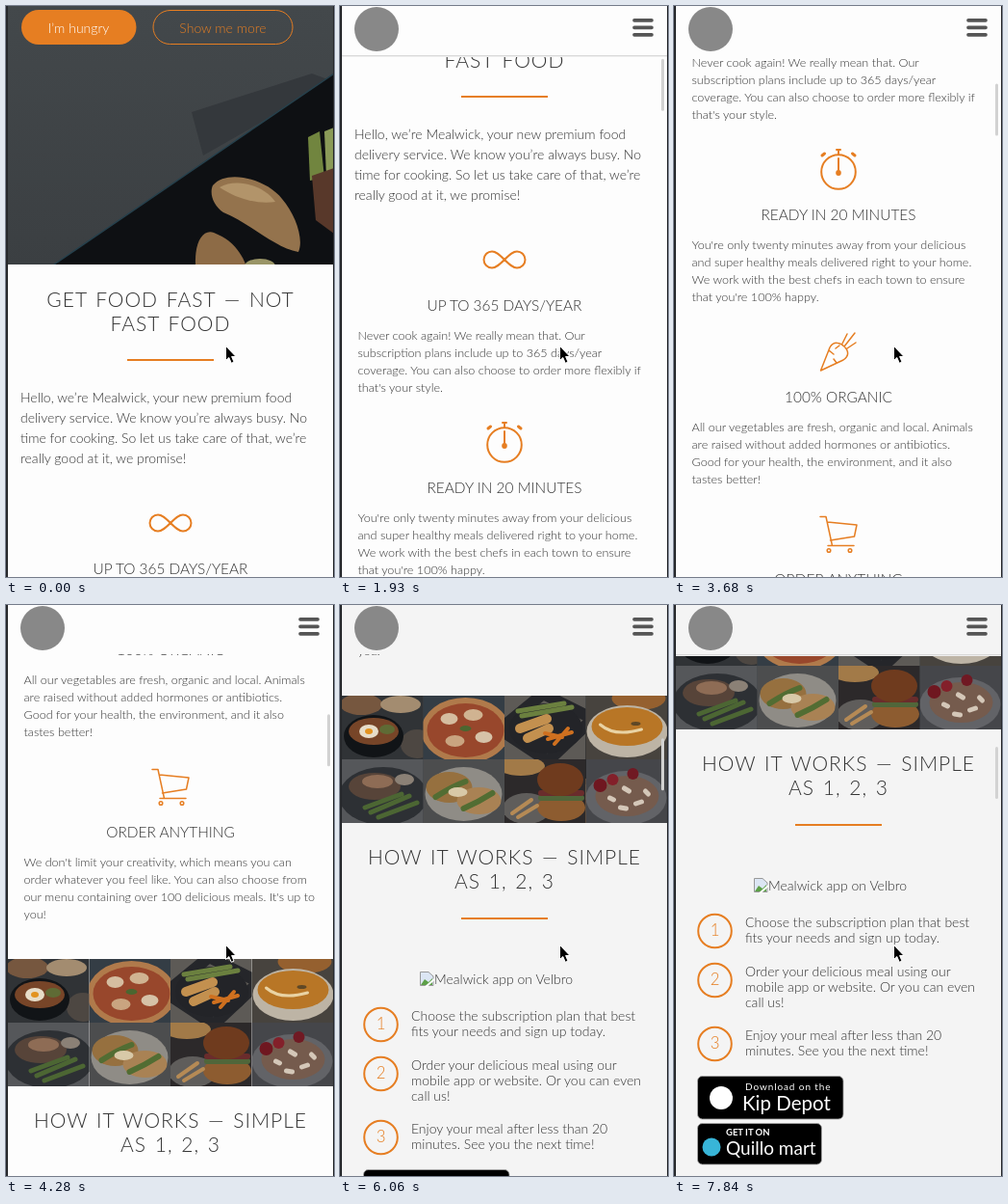
An HTML page that plays this animation: 341x592 px, repeating every 7.99 s.

```html
<!DOCTYPE html>
<html lang="en">
<head>
<meta charset="utf-8">
<title>Food delivery page</title>
<style>
  html, body { margin: 0; width: 100%; height: 100%; overflow: hidden; background: #fdfdfd; }
  svg { display: block; width: 341px; height: 592px; }
  text { font: 300 14px Lato, sans-serif; fill: #333; }
  .title { font-size: 21px; letter-spacing: 1px; word-spacing: 2px; }
  .head { font-size: 15.4px; }
  .small { font-size: 12.6px; }
  .num { font-size: 16.8px; fill: #e67e22; }
  .mid { text-anchor: middle; }
  .line { fill: none; stroke: #e67e22; stroke-width: 2; stroke-linejoin: round; stroke-linecap: round; }
  .thin { stroke-width: 1.5; }
  .thick { stroke-width: 3; }
  .badge { fill: #000; stroke: #a6a6a6; stroke-width: .8; }
  .badge ~ text { fill: #fff; }
  .paper { fill: var(--paper); }
</style>
</head>
<body>
<svg id="stage" viewBox="0 0 341 592">
  <defs>
    <linearGradient id="wall" x2="0" y2="1">
      <stop stop-color="#43484b"/><stop offset="1" stop-color="#3b3f42"/>
    </linearGradient>
    <clipPath id="tile"><rect width="84.5" height="66"/></clipPath>
  </defs>

  <!-- hero photo stays put while the page slides over it -->
  <rect width="341" height="270" fill="url(#wall)"/>
  <path d="M193 110L318 70L340 78L205 155Z" fill="#34383c"/>
  <path d="M50 268L341 70V268Z" fill="#0e1013"/>
  <path d="M50 268L341 70" stroke="#26404c" stroke-width="1.5"/>
  <path d="M215 186C230 168 272 180 287 200C301 216 310 242 304 255C280 251 255 226 226 214C216 207 211 195 215 186Z" fill="#94734d"/>
  <path d="M222 188C240 178 268 186 280 203C262 206 240 200 222 188Z" fill="#b2946a"/>
  <path d="M197 268C196 246 204 231 216 235C234 242 244 254 250 270Z" fill="#8d6b46"/>
  <ellipse cx="264" cy="270" rx="16" ry="8" fill="#9a9567"/>
  <path d="M314 136L326 130L331 178L316 181Z" fill="#71853f"/>
  <path d="M331 130L341 126V176L333 176Z" fill="#8a9a58"/>
  <path d="M318 176L341 168V236L322 222Z" fill="#58382a"/>

  <g id="page"></g>

  <g id="bar">
    <rect class="paper" width="341" height="51"/>
    <g id="shadow">
      <path d="M0 51.5H341" stroke="#d9d9d9"/>
      <path d="M0 52.5H341" stroke="#efefef"/>
    </g>
    <circle cx="38" cy="24" r="23" fill="#888"/>
    <path d="M306 14.8H324M306 22.3H324M306 29.8H324" stroke="#555" stroke-width="3.7" stroke-linecap="round"/>
  </g>
  <rect id="thumb" x="334" width="3" height="54" rx="1.5" fill="#d2d2d2"/>
  <path d="M0 0H2V592H0ZM340 0H341V592H340Z" fill="#26282b"/>
  <path d="M228.5 352.5V367.5L231.8 364.5L234.3 370.3L237 369.1L234.6 363.5H239Z" fill="#000" stroke="#fff"/>
</svg>

<script>
const el = id => document.getElementById(id);

const text = (x, y, str, cls = '', attrs = '') =>
  `<text x="${x}" y="${y}" class="${cls}" ${attrs}>${str}</text>`;
const lines = (x, y, gap, cls, rows) =>
  rows.map((row, i) => text(x, y + i * gap, row, cls)).join('');
const rect = (x, y, w, h, attrs) =>
  `<rect x="${x}" y="${y}" width="${w}" height="${h}" ${attrs}/>`;
const oval = (x, y, rx, ry, fill) =>
  `<ellipse cx="${x}" cy="${y}" rx="${rx}" ry="${ry}" fill="${fill}"/>`;
const stroke = (d, color, width) =>
  `<path d="${d}" fill="none" stroke="${color}" stroke-width="${width}" stroke-linecap="round"/>`;
const icon = (d, cls = '') => `<path d="${d}" class="line ${cls}"/>`;
const rule = y => rect(126, y, 90, 2, 'fill="#e67e22"');
const title = (y, rows) => lines(171, y, 25, 'title mid', rows);

const intro =
  rect(16, 4, 119.5, 36, 'rx="18" fill="#e67e22"') +
  text(75.5, 28, 'I’m hungry', 'mid', 'style="fill:#fff"') +
  rect(153, 4.5, 145, 35, 'rx="17.5" class="line" style="stroke-width:1"') +
  text(225.5, 28, 'Show me more', 'mid', 'style="fill:#e67e22"') +
  rect(0, 268, 341, 1014, 'class="paper"') +
  title(312, ['GET FOOD FAST — NOT', 'FAST FOOD']) + rule(366) +
  lines(15, 411, 21, '', [
    'Hello, we’re Mealwick, your new premium food',
    'delivery service. We know you’re always busy. No',
    'time for cooking. So let us take care of that, we’re',
    'really good at it, we promise!']);

const icons =
  icon('M171 536C165 530 162 527.5 158 527.5A8.5 8.5 0 0 0 158 544.5C162 544.5 165 542 171 536S180 527.5 184 527.5A8.5 8.5 0 0 1 184 544.5C180 544.5 177 542 171 536') +
  '<circle cx="171" cy="728" r="17.8" class="line"/>' +
  icon('M171 705V710M169 705H173M171 714V726') +
  icon('M154 711L156.5 709M188 711L185.5 709', 'thick') +
  oval(171, 729, 2.8, 3, '#e67e22') +
  icon('M152.5 934L162 910C166 903 173 905 177 909C182 914 182 919 176 923ZM177 909L188 895M175 906L180 896M180 911L189 905M161 913L166 917M169 926L166 922M172 908L168 911', 'thin') +
  icon('M152 1085.5H158L164.5 1115.5M160 1115.5H187M159.5 1091L190 1094L187.5 1106L162.5 1110', 'thin') +
  '<circle cx="161" cy="1120.5" r="1.8" class="line thin"/><circle cx="183" cy="1120.5" r="1.8" class="line thin"/>';

const features = [
  ['UP TO 365 DAYS/YEAR',
    'Never cook again! We really mean that. Our',
    'subscription plans include up to 365 days/year',
    'coverage. You can also choose to order more flexibly if',
    'that\'s your style.'],
  ['READY IN 20 MINUTES',
    'You\'re only twenty minutes away from your delicious',
    'and super healthy meals delivered right to your home.',
    'We work with the best chefs in each town to ensure',
    'that you\'re 100% happy.'],
  ['100% ORGANIC',
    'All our vegetables are fresh, organic and local. Animals',
    'are raised without added hormones or antibiotics.',
    'Good for your health, the environment, and it also',
    'tastes better!'],
  ['ORDER ANYTHING',
    'We don\'t limit your creativity, which means you can',
    'order whatever you feel like. You can also choose from',
    'our menu containing over 100 delicious meals. It\'s up to',
    'you!']
].map(([head, ...rows], i) =>
  text(171, 588.5 + i * 189, head, 'head mid') +
  lines(18.5, 618.5 + i * 189, 18, 'small', rows)).join('');

const photo = (col, row, back, ...shapes) =>
  `<g transform="translate(${2 + col * 84.5} ${1282 + row * 66})" clip-path="url(#tile)">` +
  rect(0, 0, 85, 66, `fill="${back}"`) + shapes.join('') + '</g>';

const photos =
  photo(0, 0, '#303336', oval(20, 9, 22, 11, '#76573f'), oval(61, 9, 21, 9, '#a38c70'),
    oval(78, 50, 17, 15, '#4d4742'), oval(33, 42, 31, 22, '#111417'), oval(33, 37, 26, 14, '#774528'),
    oval(28, 37, 10, 7, '#e7ddc8'), oval(28, 37, 4, 3, '#e29320'), oval(47, 35, 8, 5, '#5f6b35')) +
  photo(1, 0, '#343d45', oval(44, 36, 46, 34, '#b07a4b'), oval(44, 36, 40, 28, '#98472c'),
    oval(27, 24, 9, 6, '#d5bda0'), oval(52, 20, 10, 6, '#d0b391'), oval(33, 47, 10, 6, '#c9a480'),
    oval(63, 43, 9, 6, '#d6c2a8'), oval(44, 34, 6, 3, '#4b6630')) +
  photo(2, 0, '#5d5a56', stroke('M-5 35L40 -2L92 24L45 68Z', '#25262a', 12), oval(43, 34, 38, 26, '#232428'),
    stroke('M14 16L62 8M18 21L70 12', '#6b803f', 5), stroke('M16 34L44 24M24 44L46 34', '#c3904f', 10),
    stroke('M45 45L70 38M52 50L66 34M42 39L60 43', '#cf701f', 4)) +
  photo(3, 0, '#47433e', oval(55, 3, 28, 12, '#95602f'), oval(43, 37, 42, 27, '#bdb4a5'),
    oval(43, 32, 37, 20, '#b87626'), stroke('M15 30Q30 43 58 35', '#e9d3a4', 3), oval(52, 29, 5, 2, '#5f4826')) +
  photo(0, 1, '#55575a', oval(43, 38, 46, 30, '#2d3034'), oval(34, 28, 27, 14, '#574439'),
    oval(37, 23, 16, 7, '#8e6c55'), stroke('M30 55L70 38M38 60L78 45M24 50L62 36', '#4c6633', 5),
    oval(65, 21, 10, 6, '#8b8176')) +
  photo(1, 1, '#4c4d4e', oval(42, 36, 40, 28, '#8f8c86'), oval(27, 29, 24, 16, '#96703f'),
    oval(58, 43, 23, 14, '#a98254'), stroke('M13 39Q30 28 44 23M42 51Q58 44 72 35', '#526d33', 6),
    oval(36, 34, 10, 5, '#d8c9a8')) +
  photo(2, 1, '#2c292a', oval(17, 7, 25, 10, '#a27a48'), oval(23, 51, 25, 16, '#5f5d5b'),
    oval(59, 50, 25, 14, '#8d5c30'), stroke('M38 40H80', '#50663a', 6), stroke('M38 35H80', '#6a2c2c', 6),
    oval(58, 21, 24, 17, '#6f3b1e'), stroke('M8 56L28 42M14 60L34 48', '#b58a55', 4)) +
  photo(3, 1, '#45464a', oval(42, 40, 42, 28, '#626367'), oval(43, 38, 33, 21, '#755b4d'),
    stroke('M25 40L29 42M40 30L45 33M52 46L58 44M62 33L65 36M36 50L42 51', '#d4c7b8', 5),
    oval(15, 27, 7, 7, '#6f1720'), oval(28, 21, 6, 6, '#83202a'), oval(49, 15, 6, 6, '#701923'));

const steps = [
  [1623, 1619, 'Choose the subscription plan that best', 'fits your needs and sign up today.'],
  [1674, 1670, 'Order your delicious meal using our', 'mobile app or website. Or you can even', 'call us!'],
  [1740, 1736, 'Enjoy your meal after less than 20', 'minutes. See you the next time!']
].map(([cy, y, ...rows], i) =>
  `<circle cx="42.5" cy="${cy}" r="17.3" class="line"/>` +
  text(42.5, cy + 4.5, i + 1, 'num mid') + lines(74, y, 16, '', rows)).join('');

const brokenImage =
  '<path d="M83.5 1568.5H92L97 1573V1582.5H83.5Z" fill="#dce6f4" stroke="#999"/>' +
  '<path d="M84 1582L88 1576L92 1579L96 1575V1582Z" fill="#5da048"/>' +
  '<path d="M89 1584L98 1576" stroke="#fff" stroke-width="2"/>';

const badge = (y, w, h, dot, body) =>
  `<g>${rect(24.5, y, w, h, 'rx="5" class="badge"')}${dot}${body}</g>`;

const how =
  rect(0, 1414, 341, 700, 'class="paper"') +
  title(1457, ['HOW IT WORKS — SIMPLE', 'AS 1, 2, 3']) + rule(1512) +
  brokenImage + text(98, 1581, 'Mealwick app on Velbro') + steps +
  badge(1773.5, 151.5, 44.5, oval(49, 1796, 12, 12, '#fff'),
    text(74, 1788, 'Download on the', '', 'style="font-size:10px;font-weight:400;letter-spacing:.9px"') +
    text(71, 1809, 'Kip Depot', '', 'style="font-size:20.5px;font-weight:400"')) +
  badge(1822.5, 129, 42.5, oval(39, 1847, 9.5, 9.5, '#38b5d8'),
    text(54, 1835, 'GET IT ON', '', 'style="font-size:9.5px;font-weight:700"') +
    text(54, 1855, 'Quillo mart', '', 'style="font-size:19px;font-weight:400"'));

el('page').innerHTML = intro + icons + features + photos + how;

// Scroll offset by tick; swipes with a slow start and a drifting stop
const LOOP = 7990, TICK = 147.8;
const path = [[0, 0], [1, 6], [3, 84], [6, 211], [7, 240], [11, 240], [12, 246], [14, 300],
  [17, 432], [19, 507], [21, 524], [22, 524], [24, 556], [26, 700], [28, 862], [29, 915],
  [31, 944], [32, 950], [33, 950], [35, 966], [37, 1002], [39, 1100], [41, 1188],
  [43, 1230], [50, 1230], [51, 1234], [53, 1285], [55, 1285]];

function scrollAt(n) {
  const i = path.findIndex(([tick]) => tick > n);
  const [a, from] = path[i - 1], [b, to] = path[i];
  return Math.round(from + (to - from) * (n - a) / (b - a));
}

function thumbOpacity(n) {
  if (n < 7 || n === 10 || n === 11 || (n > 46 && n < 51)) return 0;
  return n === 46 ? .5 : 1;
}

// The page greys slightly from swipe to swipe
const paper = n => n < 30 ? '#fdfdfd' : n < 41 ? '#fafafa' : '#f4f4f4';

function draw(now) {
  const n = Math.floor((now % LOOP + 10) / TICK);
  const y = scrollAt(n);
  el('page').setAttribute('transform', `translate(0 ${-y})`);
  el('stage').style.setProperty('--paper', paper(n));
  el('bar').style.display = n < 7 ? 'none' : '';
  el('shadow').style.display = n < 23 || n > 50 ? '' : 'none';
  el('thumb').setAttribute('y', 76 + (y - 507) * .0913);
  el('thumb').setAttribute('opacity', thumbOpacity(n));
  requestAnimationFrame(draw);
}
requestAnimationFrame(draw);
</script>
</body>
</html>
```
